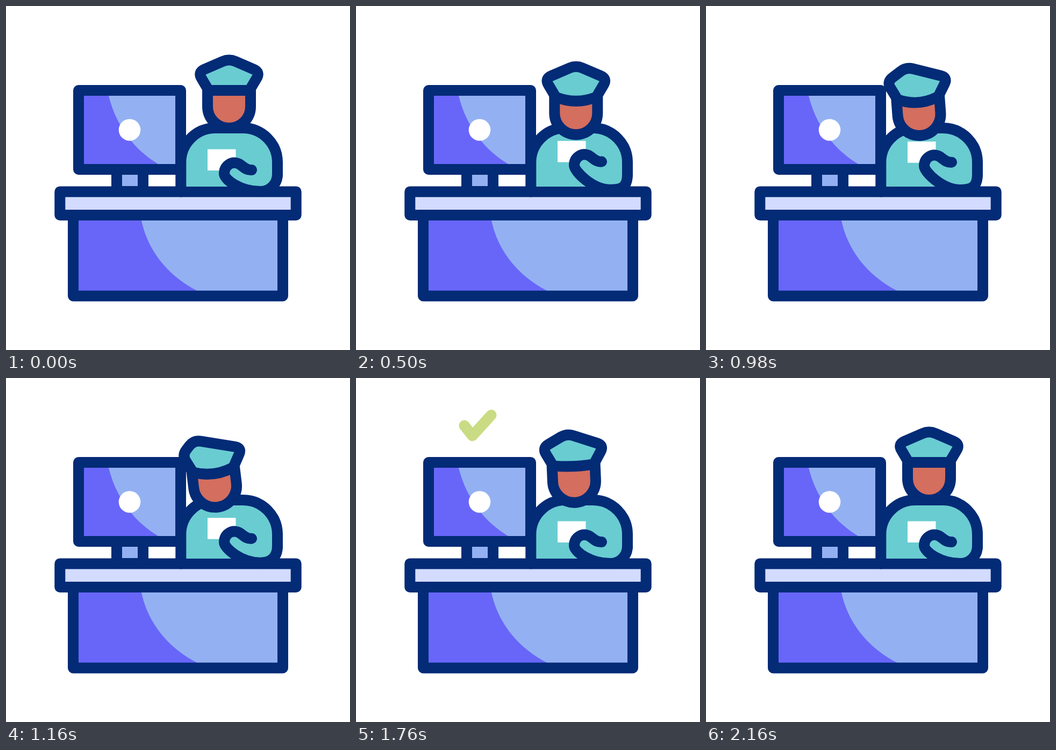
These frames come from a looping animation (640x640 px, 2.4 s). An HTML page:

```html
<!DOCTYPE html>
<html lang="en">
<head>
<meta charset="utf-8">
<title>Reception desk</title>
<style>
  html, body { margin: 0; width: 100%; height: 100%; overflow: hidden; background: #fff; }
  svg { display: block; width: 100%; height: 100%; }
  .line { stroke: #032b76; stroke-width: 20; stroke-linecap: round; stroke-linejoin: round; }
  .teal { fill: #69ccd1; }
  .skin { fill: #d46e5e; }
  .blue { fill: #93b1f2; }
  .violet { fill: #6866f9; }
  .pale { fill: #d3dbff; }
  .none { fill: none; }
</style>
</head>
<body>
<svg viewBox="0 0 640 640">
  <path id="check" class="none" d="M201.5 88.5L216.5 107.5L251.5 69" stroke="#92b806"
        stroke-width="20" stroke-linecap="round" stroke-linejoin="round"/>

  <g id="monitor">
    <path class="line blue" d="M206 304V345H255V304"/>
    <rect class="blue" x="135" y="157" width="190" height="147"/>
    <path class="violet" d="M135 157H189L191 167C204 220 236 266 283 294L300 304H135Z"/>
    <rect class="line none" x="135" y="157" width="190" height="147"/>
    <circle cx="230" cy="230.5" r="20.3" fill="#fff"/>
  </g>

  <g id="desk">
    <rect class="blue" x="125" y="389" width="390" height="150.5"/>
    <path class="violet" d="M125 389H250L252 399C264 456 302 502 355 529.5L372 539.5H125Z"/>
    <rect class="line none" x="125" y="389" width="390" height="150.5"/>
    <rect class="line pale" x="100.3" y="345.4" width="439.4" height="43.6"/>
  </g>

  <g id="torso">
    <path class="teal" d="M325 336V291A64 64 0 0 1 389 227H441A64 64 0 0 1 505 291V315L473 336Z"/>
    <path class="line none" d="M325.3 345.5V291A64 64 0 0 1 389 227H441A64 64 0 0 1 505 291V315"/>
  </g>

  <g id="head">
    <path class="line skin" d="M-40 -30V0A40 40 0 0 0 40 0V-30"/>
    <path id="cap" class="line teal"/>
  </g>
  <rect id="badge" x="375" y="266.5" width="52.5" height="39.5" fill="#fff"/>
  <path id="arm" class="line teal"/>
</svg>
<script>
const LOOP = 2400;
const [check, head, cap, badge, arm] =
  ["check", "head", "cap", "badge", "arm"].map(id => document.getElementById(id));

const upright = { x: 415, y: 187, tilt: 0, sag: 0, peak: 0 };
const lowered = { x: 408, y: 202, tilt: 0, sag: 19, peak: 0 };
const turned = { x: 389, y: 200.5, tilt: -7, sag: 15, peak: -29 };

const mix = (a, b, k) => a + (b - a) * k;
const mixPose = (a, b, k) =>
  Object.fromEntries(Object.keys(a).map(key => [key, mix(a[key], b[key], k)]));
const ramp = (t, from, to) => Math.min(1, Math.max(0, (t - from) / (to - from)));
const ease = (t, from, to) => {
  const u = ramp(t, from, to);
  return u * u * (3 - 2 * u);
};

// Polyline whose inner corners are rounded, starting `cut` units before each corner
function roundedPath(points, cut) {
  const toward = ([x, y], [px, py]) => {
    const k = cut / Math.hypot(px - x, py - y);
    return [mix(x, px, k), mix(y, py, k)];
  };
  const corners = points.slice(1, -1).map((p, i) =>
    `L${toward(p, points[i])}Q${p} ${toward(p, points[i + 2])}`);
  return `M${points[0]}${corners.join("")}L${points.at(-1)}`;
}

// The cap is symmetric until its peak slides sideways; the brim sags as the head bows.
function capPath({ peak, sag }) {
  const outline = [[-38, -30], [-58 - 0.14 * peak, -64], [peak, -89], [58, -64], [38, -30]];
  return `${roundedPath(outline, 13)}Q0 ${sag - 30} -38 -30Z`;
}

function armPath(lift) {
  const hand = 305 - 19 * lift, bend = 345 - 4 * lift;
  return `M457 ${hand}c-11 1 -16 -7 -23 -11c-14 -7 -28 3 -28 18` +
    `C406 ${hand + 18} ${436 + 5 * lift} ${bend} 473 ${bend}` +
    `C${491 + 5 * lift} ${bend} 505 ${331 + 7 * lift} 505 313V291`;
}

function draw(t) {
  let pose = mixPose(upright, lowered, ease(t, 60, 670));
  pose = mixPose(pose, turned, ease(t, 733, 1167));
  pose = mixPose(pose, upright, ease(t, 1400, 2000));
  head.setAttribute("transform", `translate(${pose.x} ${pose.y}) rotate(${pose.tilt})`);
  cap.setAttribute("d", capPath(pose));

  const lift = ease(t, 60, 670) - ease(t, 780, 1400);
  badge.setAttribute("transform", `translate(0 ${-19 * lift})`);
  arm.setAttribute("d", armPath(lift));

  check.setAttribute("transform", `translate(0 ${100 * (1 - ease(t, 1040, 1760))})`);
  check.setAttribute("opacity", 1 - ramp(t, 1660, 1860));
}

const begin = performance.now();
function tick() {
  draw((performance.now() - begin) % LOOP);
  requestAnimationFrame(tick);
}
tick();
</script>
</body>
</html>
```
